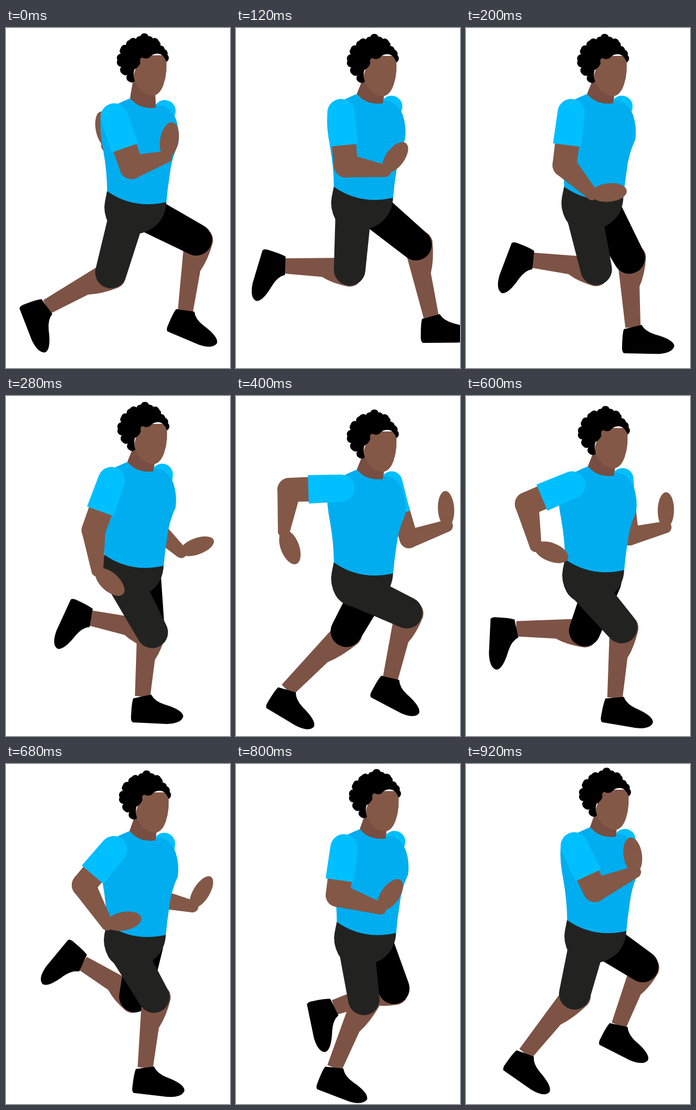
Animation of 412 by 623 pixels, one loop 960 ms. Source, as an HTML page with a canvas:

```html
<!DOCTYPE html>
<html lang="en">
<head>
<meta charset="utf-8">
<title>Runner</title>
<style>
  html, body { margin: 0; width: 100%; height: 100%; overflow: hidden; background: #fff; }
  canvas { display: block; }
</style>
</head>
<body>
<canvas id="stage" width="412" height="623"></canvas>
<script>
const ctx = document.getElementById('stage').getContext('2d');
const LOOP = 960, STEP = 40;
const SKIN = '#835847', SHADE = '#774e41', LEG = '#7d5345';
const SHIRT = '#00adef', SLEEVE = '#00bfff', SHORTS = '#222321', BLACK = '#000';

const times = [0, 120, 280, 400, 520, 680, 920];
const headMoves = [[0, 0], [0, 1], [1, 1], [0, 15], [0, 15], [4, 2], [4, -3]];
const bodyMoves = [[0, 0], [-6, -8], [-5, -8], [-6, 6], [-7, 6], [-1, -6], [0, -13]];

// Each pose: middle joint x, y, end joint x, y, angle of hand or foot in degrees.
const limbs = {
  nearArm: { root: [199, 163], poses: [
    [231, 255, 295, 236, -80], [202, 252, 274, 262, -53], [161, 246, 168, 320, 42],
    [98, 172, 88, 248, 69], [97, 162, 88, 235, 54], [143, 222, 186, 294, -11],
    [237, 231, 311, 198, -98]] },
  farArm: { root: [292, 152], poses: [
    [240, 215, 186, 216, -101], [236, 215, 188, 228, -95], [278, 245, 322, 286, -20],
    [318, 262, 388, 238, -93], [318, 262, 376, 212, -120], [285, 248, 343, 261, -58],
    [245, 190, 204, 205, -90]] },
  nearLeg: { root: [222, 345], poses: [
    [193, 448, 75, 511, 66], [209, 443, 90, 436, 104], [269, 433, 156, 407, 112],
    [314, 397, 284, 517, 25], [299, 418, 290, 546, 10], [272, 427, 256, 557, 4],
    [200, 421, 109, 531, 32]] },
  farLeg: { root: [257, 339], poses: [
    [350, 388, 330, 518, 20], [331, 397, 359, 529, -3], [263, 432, 251, 551, 0],
    [203, 431, 94, 539, 28], [200, 431, 79, 499, 53], [237, 426, 141, 365, 127],
    [325, 371, 281, 479, 24]] }
};

const face = new Path2D('M246 50H294Q298 80 290 103Q283 123 270 124Q252 122 243 108Q235 100 235 85Z');
const curls = [[226, 98], [223, 86], [213, 83], [212, 71], [205, 59], [211, 47], [211, 37],
  [221, 31], [227, 22], [239, 20], [247, 15], [262, 15], [270, 19], [281, 24], [284, 32],
  [292, 39], [297, 49], [295, 62]];
const hair = new Path2D('M237 97' + curls.map(p => `A8 8 0 0 1 ${p}`).join('') +
  'Q290 48 280 47Q270 46 264 54Q258 58 250 54Q245 56 247 64Q244 72 236 76Q233 86 237 97Z');
const shirt = new Path2D('M228 129Q246 150 276 146Q277 140 285 141Q304 146 313 168Q320 190 317 212' +
  'Q304 240 301 270Q297 295 295 319Q235 333 186 299Q186 265 179 225Q172 190 174 165Q176 150 228 129Z');
const pelvis = new Path2D('M186 298Q235 332 295 318Q294 347 273 364Q252 381 215 379Q196 372 189 359Q178 338 182 318Z');
const foot = new Path2D('M-17 3L16-4Q22 8 40 14Q74 24 75 36Q72 49 45 50L-18 47Q-22 44-21 35Q-20 12-17 3Z');

const mix = (a, b, u) => a + (b - a) * u;
const mixAngle = (a, b, u) => a + Math.atan2(Math.sin(b - a), Math.cos(b - a)) * u;
const mixPoint = (a, b, u) => a.map((v, i) => mix(v, b[i], u));
const add = (a, b) => [a[0] + b[0], a[1] + b[1]];
const angleOf = (a, b) => Math.atan2(b[1] - a[1], b[0] - a[0]);
const distance = (a, b) => Math.hypot(b[0] - a[0], b[1] - a[1]);

function fill(path, color, at = [0, 0], angle = 0) {
  ctx.save();
  ctx.translate(...at);
  ctx.rotate(angle);
  ctx.fillStyle = color;
  ctx.fill(path);
  ctx.restore();
}

function taper(a, ra, b, rb, color) {
  const angle = angleOf(a, b), q = Math.PI / 2;
  const path = new Path2D();
  path.arc(...a, ra, angle + q, angle + 3 * q);
  path.arc(...b, rb, angle - q, angle + q);
  fill(path, color);
}

// Bones turn and stretch between poses, so that joints swing on arcs.
function solve({ root, poses }, k, u, body) {
  const bones = [k, k + 1].map(i => {
    const [mx, my, ex, ey, turn] = poses[i];
    const start = add(root, bodyMoves[i]), mid = [mx, my], end = [ex, ey];
    return { a1: angleOf(start, mid), l1: distance(start, mid),
             a2: angleOf(mid, end), l2: distance(mid, end), turn: turn * Math.PI / 180 };
  });
  const [p, q] = bones;
  const reach = (from, a, l) => {
    const angle = mixAngle(p[a], q[a], u), length = mix(p[l], q[l], u);
    return [from[0] + length * Math.cos(angle), from[1] + length * Math.sin(angle)];
  };
  const start = add(root, body), mid = reach(start, 'a1', 'l1');
  return { start, mid, end: reach(mid, 'a2', 'l2'), turn: mixAngle(p.turn, q.turn, u) };
}

function drawArm({ start, mid, end, turn }, shoulder, elbow, cuff, palm) {
  taper(start, shoulder - 2, mid, elbow, SKIN);
  taper(mid, elbow, end, 11, SKIN);
  const hand = new Path2D();
  hand.ellipse(31, 0, 33, palm, 0, 0, 7);
  fill(hand, SKIN, end, turn);
  const sleeve = new Path2D(
    `M0 ${-shoulder}A${shoulder} ${shoulder} 0 0 0 0 ${shoulder}L60 ${cuff}V${-cuff}Z`);
  fill(sleeve, SLEEVE, start, angleOf(start, mid));
}

function drawLeg({ start, mid, end, turn }, color) {
  const l = distance(mid, end);
  const shin = new Path2D(
    `M0 22L${l} 14V-14L${l * .42}-16Q${l * .25}-27 0-31Q-24-30-24 0Z`);
  fill(shin, LEG, mid, angleOf(mid, end));
  fill(foot, BLACK, end, turn);
  taper(start, 33, mid, 29, color);
}

function draw(t) {
  let k = times.length - 2;
  while (times[k] > t) k--;
  const u = (t - times[k]) / (times[k + 1] - times[k]);
  const head = mixPoint(headMoves[k], headMoves[k + 1], u);
  const body = mixPoint(bodyMoves[k], bodyMoves[k + 1], u);
  const limb = name => solve(limbs[name], k, u, body);
  const onHead = (x, y) => add([x, y], head), onBody = (x, y) => add([x, y], body);

  ctx.fillStyle = '#fff';
  ctx.fillRect(0, 0, 412, 623);
  drawArm(limb('farArm'), 20, 17, 17, 15);
  drawLeg(limb('farLeg'), BLACK);
  drawLeg(limb('nearLeg'), SHORTS);
  fill(pelvis, SHORTS, body);
  fill(new Path2D(`M${onHead(235, 88)}L${onBody(228, 129)}Q${onBody(246, 151)} ` +
    `${onBody(276, 147)}L${onHead(274, 112)}Z`), SHADE);
  fill(shirt, SHIRT, body);
  fill(face, SKIN, head);
  fill(hair, BLACK, head);
  drawArm(limb('nearArm'), 25, 22, 26, 17);
}

function tick() {
  draw(Math.floor(performance.now() % LOOP / STEP) * STEP);
  requestAnimationFrame(tick);
}
tick();
</script>
</body>
</html>
```
